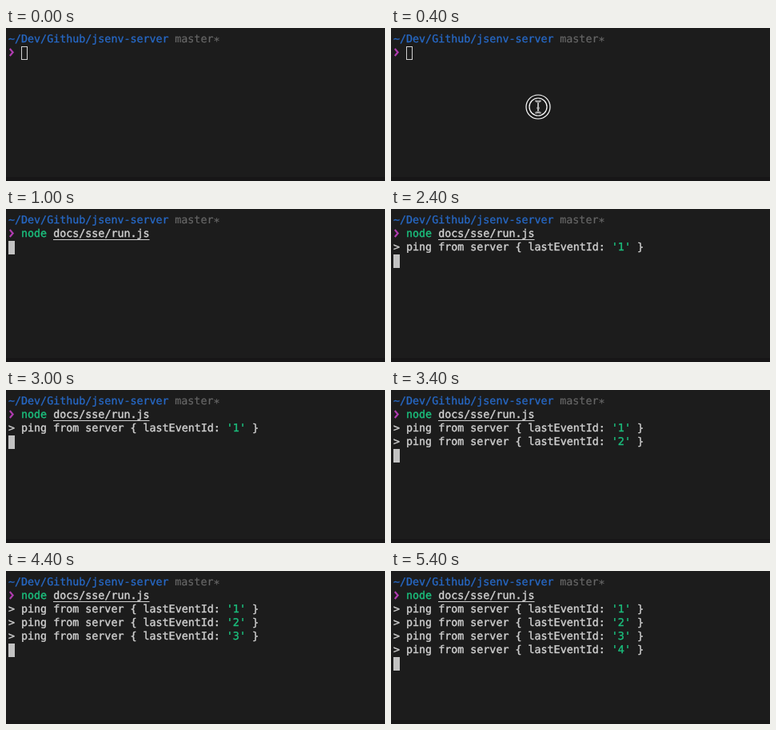
Write an HTML page that moves like this. It is 474 by 192 pixels and loops after 5800 ms.

```html
<!DOCTYPE html>
<html lang="en">
<head>
<meta charset="utf-8">
<title>Terminal</title>
<style>
html, body { margin: 0; width: 100%; height: 100%; overflow: hidden; background: #1c1c1c; }
svg { display: block; }
text {
  font: 13.33px "DejaVu Sans Mono", monospace;
  text-rendering: geometricPrecision;
  white-space: pre;
  fill: #d0d0d0;
  stroke: #d0d0d0;
  stroke-width: .4px;
}
.path { fill: #2769c6; stroke: #2769c6; stroke-width: .3px; }
.branch { fill: #666; stroke: #666; stroke-width: .2px; }
.green { fill: #1bbf7d; stroke: #1bbf7d; }
</style>
</head>
<body>
<svg width="474" height="192" viewBox="0 0 474 192">
  <rect width="474" height="192" fill="#1c1c1c"/>
  <rect y="187" width="474" height="5" fill="#171617"/>
  <text class="path" x="3" y="18">~/Dev/Github/jsenv-server</text>
  <text class="branch" x="211.3" y="18">master<tspan dy="2.5">*</tspan></text>
  <path d="M4.8 26L8.6 30.5L4.8 35" fill="none" stroke="#b03cb0" stroke-width="2.2"/>
  <g id="command">
    <text class="green" x="19" y="35">node</text>
    <text x="59.2" y="35">docs/sse/run.js</text>
    <rect x="59" y="38" width="120.5" height="1" fill="#d0d0d0"/>
  </g>
  <g id="log"></g>
  <rect id="caret" stroke="#d0d0d0"/>
  <g id="pointer" fill="none">
    <g id="rings" stroke="#fff" stroke-width="1.2">
      <circle r="15" fill="#1c1c1c"/>
      <circle r="11"/>
    </g>
    <path id="beam" d="M-3.5 -7.5Q0 -7.5 0 -5Q0 -7.5 3.5 -7.5M0 -5V5M-3.5 7.5Q0 7.5 0 5Q0 7.5 3.5 7.5M-1.5 1.5H1.5" stroke="#f4f4f4" stroke-width="2"/>
    <path d="M-3 -7.5Q0 -7.5 0 -5Q0 -7.5 3 -7.5M0 -5V5M-3 7.5Q0 7.5 0 5Q0 7.5 3 7.5" stroke="#222" stroke-width=".6"/>
  </g>
</svg>
<script>
const LOOP = 5800, STEP = 100, COL = 8.025, ROW = 17, LEFT = 3, TOP = 6;
const pings = [2400, 3400, 4400, 5400];
const enter = [[216, 176], [196, 128], [184, 99]];
const leave = [[186, 92], [196, 67], [206, 90], [212, 130], [216, 168]];

const el = id => document.getElementById(id);
const make = name => document.createElementNS("http://www.w3.org/2000/svg", name);
const show = (node, on) => node.setAttribute("visibility", on ? "visible" : "hidden");
const set = (node, attrs) => {
  for (const key in attrs) node.setAttribute(key, attrs[key]);
};
const [command, log, caret, pointer, rings] =
  ["command", "log", "caret", "pointer", "rings"].map(el);

function addText(parent, column, y, text, name = "") {
  const node = make("text");
  set(node, { x: LEFT + column * COL, y, class: name });
  node.textContent = text;
  parent.append(node);
}

const lines = pings.map((time, i) => {
  const line = make("g");
  const y = 52 + i * ROW;
  addText(line, 0, y, "> ping from server { lastEventId:");
  addText(line, 34, y, `'${i + 1}'`, "green");
  addText(line, 38, y, "}");
  log.append(line);
  return line;
});

function pointerAt(t) {
  if (t >= 100 && t < 800) {
    return enter[Math.min(Math.floor(t / STEP) - 1, enter.length - 1)];
  }
  if (t >= 3900 && t < 4400) return leave[Math.floor((t - 3900) / STEP)];
  return null;
}

function placeCaret(column, row, filled) {
  const inset = filled ? 0 : 0.5;
  set(caret, {
    x: Math.round(LEFT + column * COL) + inset,
    y: TOP + row * ROW + inset,
    width: 8 - 2 * inset,
    height: ROW - 2 * inset,
    fill: filled ? "#c2c2c2" : "none",
    "stroke-width": filled ? 0 : 1
  });
}

function render(t) {
  show(command, t >= 700);
  lines.forEach((line, i) => show(line, t >= pings[i]));

  const count = pings.filter(time => t >= time).length;
  if (t < 700) placeCaret(2, 1, t >= 500);
  else if (t < 1000) placeCaret(22, 1, true);
  else placeCaret(0, 2 + count, true);

  const spot = pointerAt(t);
  show(pointer, spot);
  if (spot) set(pointer, { transform: `translate(${spot})` });
  show(rings, spot && t >= 400 && t < 500);
}

let start = null;
function tick(now) {
  if (start === null) start = now;
  render((now - start) % LOOP);
  requestAnimationFrame(tick);
}
render(0);
requestAnimationFrame(tick);
</script>
</body>
</html>
```
